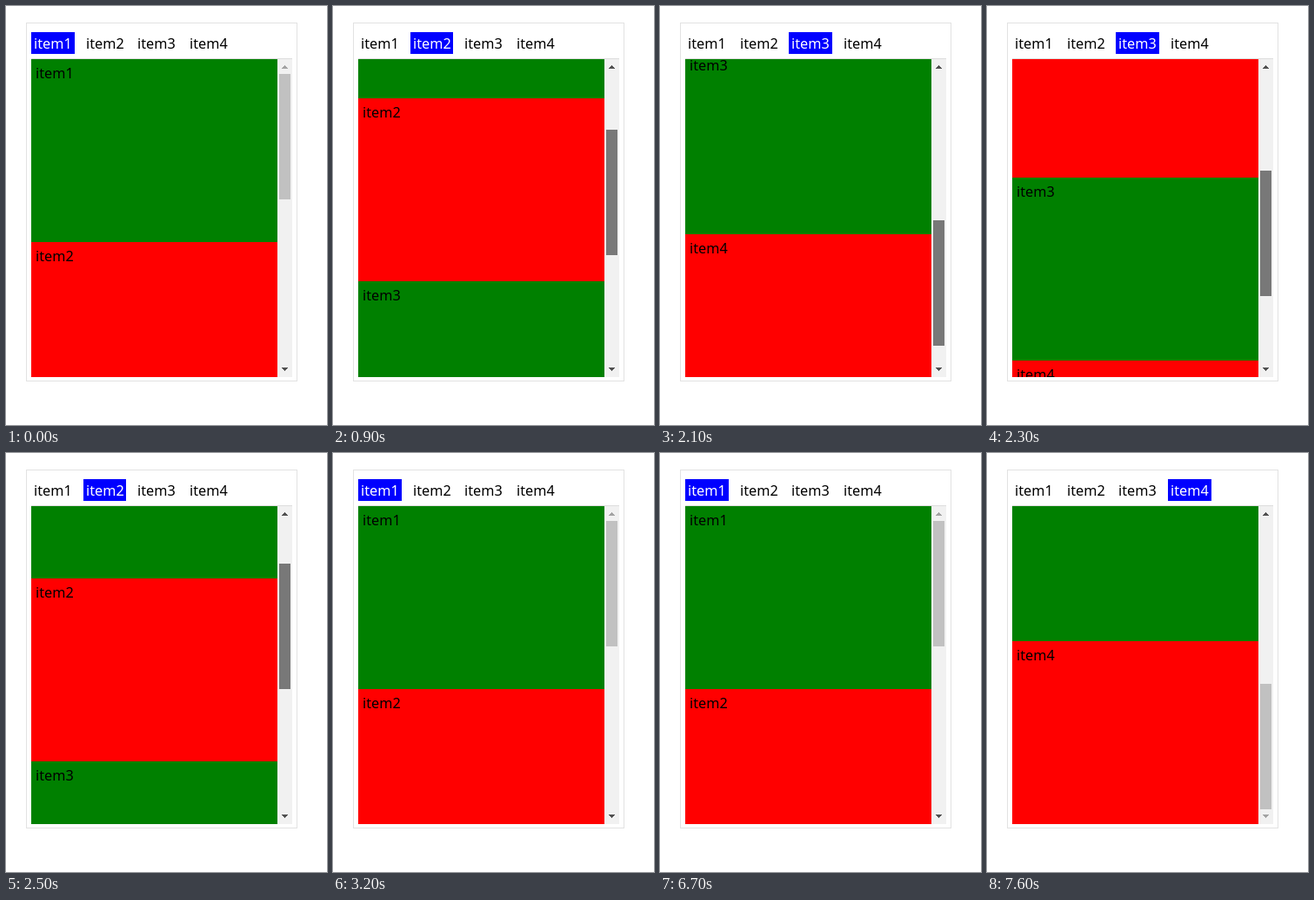
Recreate the animation shown at these times as an HTML page. Size 369x481 px, loop 8 s.

```html
<!DOCTYPE html>
<html lang="en">
<head>
<meta charset="utf-8">
<title>Scroll spy</title>
<style>
  html, body { margin: 0; width: 100%; height: 100%; overflow: hidden; background: #fff; }
  svg { display: block; font: 16.25px "Noto Sans", "Open Sans", sans-serif; }
  .tab rect { fill: none; }
  .tab.on rect { fill: #00f; }
  .tab.on text { fill: #fff; }
  .off { fill: #a3a3a3; }
  #up, #down { fill: #505050; }
  #up.off, #down.off { fill: #a3a3a3; }
  #thumb { fill: #c1c1c1; animation: press 8s step-end infinite; }
  @keyframes press {
    0% { fill: #c1c1c1; }
    3.75% { fill: #787878; }
    40% { fill: #c1c1c1; }
  }
</style>
</head>
<body>
<svg width="369" height="481" viewBox="0 0 369 481" shape-rendering="crispEdges">
  <defs><clipPath id="view"><rect x="29" y="61" width="283" height="365"/></clipPath></defs>
  <rect x="23.5" y="19.5" width="311" height="411" fill="none" stroke="#e2e2e2"/>
  <rect x="29" y="60" width="300" height="1" fill="#ddd"/>
  <g id="tabs"></g>
  <g clip-path="url(#view)"><g id="list"></g></g>
  <rect x="312" y="61" width="17" height="365" fill="#f1f1f1"/>
  <path id="up" d="M320 68h1v1h1v1h1v1h1v1h-7v-1h1v-1h1v-1h1z"/>
  <path id="down" d="M317 415h7v1h-1v1h-1v1h-1v1h-1v-1h-1v-1h-1v-1h-1z"/>
  <rect id="thumb" x="314" y="78" width="13" height="144"/>
</svg>
<script>
const LOOP = 8000, ITEM = 210, VIEW = 365, MAX = 4 * ITEM - VIEW, TRAVEL = 187;
const $ = id => document.getElementById(id);

// Scroll positions of the two thumb drags, one per 100 ms
const dragDown = [20, 81, 165, 252, 337, 421, MAX];
const dragUp = [429, 363, 284, 203, 127, 51, 0];
const keys = [
  [0, 0],
  ...dragDown.map((s, i) => [700 + 100 * i, s]),
  ...dragUp.map((s, i) => [2100 + 100 * i, s]),
  [4300, 2 * ITEM], [6700, 0], [7600, MAX]
];

const tabX = [29, 89, 148, 208];
$('tabs').innerHTML = tabX.map((x, i) =>
  `<g class="tab"><rect x="${x}" y="30" width="${i % 2 ? 49 + (i > 1) : 50}" height="25"/>` +
  `<text x="${x + 3}" y="49">item${i + 1}</text></g>`).join('');
$('list').innerHTML = tabX.map((x, i) =>
  `<rect x="29" y="${61 + i * ITEM}" width="283" height="${ITEM}" fill="${i % 2 ? 'red' : 'green'}"/>` +
  `<text x="34" y="${83 + i * ITEM}">item${i + 1}</text>`).join('');
const tabs = [...$('tabs').children];

function show(s) {
  // The item under the middle of the view is the active one
  const active = Math.floor((s + VIEW / 2) / ITEM);
  tabs.forEach((tab, i) => tab.classList.toggle('on', i === active));
  $('list').setAttribute('transform', `translate(0 ${-s})`);
  $('thumb').setAttribute('y', 78 + Math.floor(s * TRAVEL / MAX));
  $('up').classList.toggle('off', s === 0);
  $('down').classList.toggle('off', s === MAX);
}

const press = $('thumb').getAnimations()[0];
press.startTime = 0;

function frame() {
  const t = performance.now() % LOOP;
  let s = 0;
  for (const [at, pos] of keys) if (t >= at) s = pos;
  show(s);
  requestAnimationFrame(frame);
}
frame();
</script>
</body>
</html>
```
